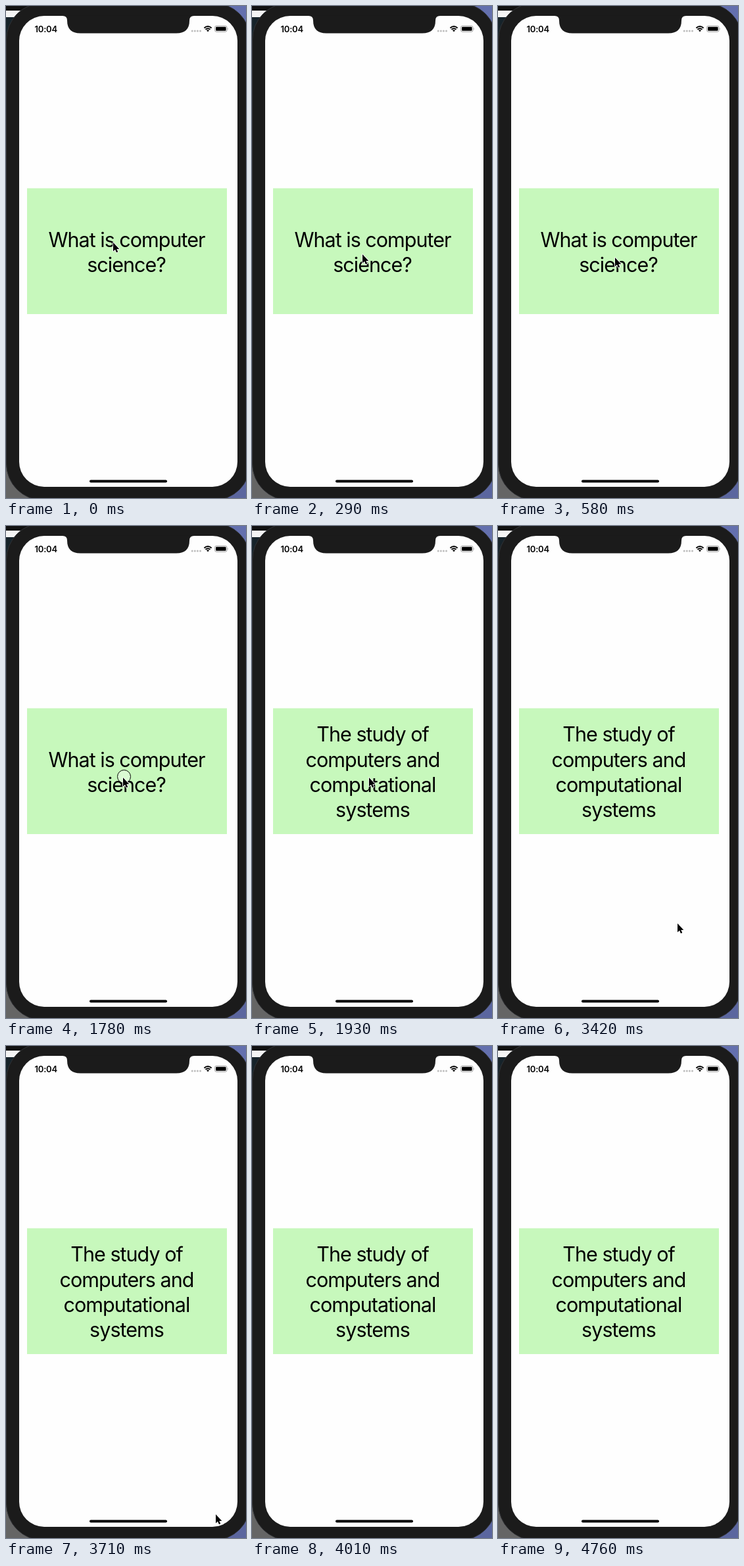
These frames come from a looping animation (365 px wide and 749 px high, 4860 ms). An HTML page:

```html
<!DOCTYPE html>
<html lang="en">
<head>
<meta charset="utf-8">
<title>Flash card</title>
<style>
html, body { margin: 0; width: 100%; height: 100%; overflow: hidden; background: #1b1b1b; }
svg { display: block; width: 365px; height: 749px; }
text { font-family: Inter, "Liberation Sans", sans-serif; font-optical-sizing: none; }
.card { font-size: 30.5px; letter-spacing: -.98px; text-anchor: middle; }
.clock { font-size: 13px; font-weight: 600; letter-spacing: -.2px; }
</style>
</head>
<body>
<svg viewBox="0 0 365 749">
  <defs>
    <linearGradient id="desk" x2="0" y2="1">
      <stop offset="0" stop-color="#6470ae"/>
      <stop offset="1" stop-color="#5b669f"/>
    </linearGradient>
  </defs>

  <!-- desktop behind the phone -->
  <rect width="365" height="749" fill="url(#desk)"/>
  <rect width="60" height="749" fill="#656565"/>
  <rect width="60" height="240" fill="#16232a"/>
  <rect width="60" height="7" fill="#111"/>
  <rect y="7" width="60" height="10" fill="#f4f4f4"/>

  <!-- phone -->
  <rect x=".5" y="-4.5" width="371" height="757" rx="56" fill="#1b1b1b" stroke="#303236"/>
  <rect x="20" y="15" width="332" height="717" rx="38" fill="#fefefe"/>
  <path d="M86 14.5V15Q93 15 93 22Q93 41.5 113 41.5H259Q279 41.5 279 22Q279 15 286 15V14.5Z" fill="#1b1b1b"/>
  <rect x="127" y="721.5" width="118" height="4" rx="2"/>

  <!-- status bar -->
  <text class="clock" x="43.5" y="39.5">10:04</text>
  <path d="M283.2 38h13" stroke="#bdbdbd" stroke-width="3" stroke-linecap="round" stroke-dasharray="0 4.1"/>
  <g fill="none" stroke="#000" stroke-width="1.9">
    <path d="M301.4 33.5Q307 28.5 312.6 33.5M303.5 35.8Q307 32.7 310.5 35.8"/>
    <path d="M305 37.2Q307 35.5 309 37.2L307 39.3Z" fill="#000" stroke="none"/>
  </g>
  <rect x="317.5" y="30.3" width="18.6" height="9" rx="2.5" fill="none" stroke="#999" stroke-width=".9"/>
  <rect x="319" y="31.8" width="15.6" height="6" rx="1.2"/>
  <path d="M337.2 33.2Q338.8 34.8 337.2 36.4Z" fill="#999"/>

  <!-- card -->
  <rect x="32" y="277.5" width="304" height="191.5" fill="#c7f8bc"/>
  <g id="front" class="card">
    <text x="183.5" y="366.5">What is computer</text>
    <text x="183" y="404.7">science?</text>
  </g>
  <g id="back" class="card">
    <text x="183.5" y="328.2">The study of</text>
    <text x="183.5" y="366.5">computers and</text>
    <text x="183.5" y="404.7">computational</text>
    <text x="183.5" y="442.9">systems</text>
  </g>

  <circle id="tap" cx="179.5" cy="381.5" r="10" fill="#fff" fill-opacity=".35" stroke="#000"/>
  <path id="cursor" d="M2 2V15.5L5 12.7L7 17.3L9.3 16.3L7.3 11.9H11.3Z"
        stroke="#fff" stroke-width="1.6" stroke-linejoin="round" paint-order="stroke"/>
</svg>
<script>
const LOOP = 4860, TAP = 1780, FLIP = 1930, LEAVE = 4010;

// pointer stops: start time, x, y
const stops = [
  [0, 161, 358], [150, 161, 364], [290, 166, 376], [440, 174, 379], [580, 176, 381],
  [3130, 176, 385], [3270, 232, 517], [3420, 271, 603], [3570, 271, 605],
  [3710, 317, 711], [3860, 318, 706]
];

const el = id => document.getElementById(id);
const show = (id, on) => el(id).setAttribute("visibility", on ? "visible" : "hidden");

function draw(t) {
  const [, x, y] = stops.findLast(s => s[0] <= t);
  el("cursor").setAttribute("transform", `translate(${x} ${y})`);
  show("cursor", t < LEAVE);
  show("tap", t >= TAP && t < FLIP);
  show("front", t < FLIP);
  show("back", t >= FLIP);
}

const start = performance.now();
function tick() {
  draw((performance.now() - start) % LOOP);
  requestAnimationFrame(tick);
}
tick();
</script>
</body>
</html>
```
